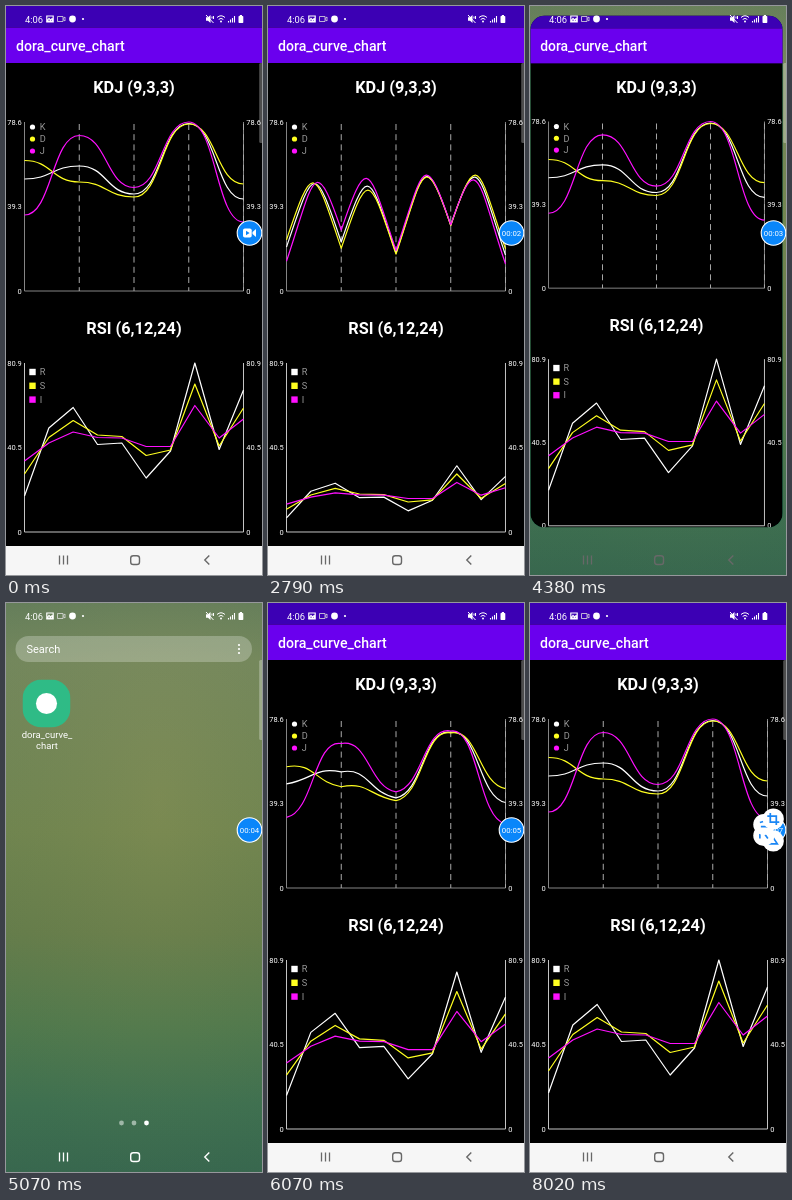
An HTML page for the animation above (8080 ms loop, 256x569 px).

```html
<!DOCTYPE html>
<html lang="en">
<head>
<meta charset="utf-8">
<title>Curve chart demo</title>
<style>
html, body { margin: 0; width: 100%; height: 100%; overflow: hidden; background: #000; }
svg { display: block; width: 100vw; height: 100vh; font-family: Roboto, "Open Sans", sans-serif; }
</style>
</head>
<body>
<svg id="stage" viewBox="0 0 256 569" preserveAspectRatio="none"></svg>
<script>
const LOOP = 8080, LAST = 8020;
const CLOSE = { starts: [1555, 4316], span: 400 };
const OPEN = { starts: [2420, 5110], span: 390 };
const CHART_STARTS = [2529, 5198], CHART_SPAN = 1190;
const COLORS = ['#fff', '#ffff20', '#ff10ff'];

const KDJ = [
  [173, 160, 188, 117.5, 193],
  [154.5, 176, 191, 118, 178],
  [209, 129.5, 181.5, 116, 216]
];
const RSI = [
  [490, 422, 401.5, 438.5, 437, 472, 445, 357, 443.5, 384],
  [468, 431.5, 414.5, 429, 430.5, 449.5, 444, 378, 440, 402],
  [455, 437, 426, 431.5, 432, 440.5, 440.5, 399.5, 432, 413]
];

const clamp = v => Math.max(0, Math.min(1, v));
const smooth = v => { v = clamp(v); return v * v * (3 - 2 * v); };
const inOut = v => v < .5 ? 4 * v ** 3 : 1 - 4 * (1 - v) ** 3;
const xAt = (i, n) => 18.5 + 219 * i / (n - 1);
const text = (x, y, size, s, extra = '') =>
  `<text x="${x}" y="${y}" font-size="${size}" fill="#fff" ${extra}>${s}</text>`;
const rect = (x, y, w, h, fill, extra = '') =>
  `<rect x="${x}" y="${y}" width="${w}" height="${h}" fill="${fill}" ${extra}/>`;
const circle = (x, y, r, fill, extra = '') =>
  `<circle cx="${x}" cy="${y}" r="${r}" fill="${fill}" ${extra}/>`;
const path = (d, color, width = 1, extra = '') =>
  `<path d="${d}" fill="none" stroke="${color}" stroke-width="${width}" ${extra}/>`;

function axes(top, labels, color) {
  const bottom = top + 169;
  return path(`M18.5 ${top}V${bottom}H237.5V${top}`, color) +
    labels.map((s, i) => {
      const y = top + 84.5 * i + 2.7;
      return text(15.8, y, 7.5, s, 'text-anchor="end"') + text(240.3, y, 7.5, s);
    }).join('');
}

function legend(names, top, gap, mark) {
  return [...names].map((s, i) =>
    mark(26.5, top + gap * i, COLORS[i]) +
    text(33.8, top + gap * i + 3.3, 9.2, s, 'style="fill:#999"')).join('');
}

const lines = id => COLORS.map((c, i) =>
  path('', c, 1.2, `id="${id}${i}" stroke-linejoin="round"`)).join('');

const appMarkup = () =>
  rect(0, 0, 256, 569, '#000') +
  rect(0, 0, 256, 21.5, '#3c00b4') +
  rect(0, 21.5, 256, 35.5, '#6a00ee') +
  rect(0, 540, 256, 29, '#f6f6f6') +
  text(10, 44.8, 14.1, 'dora_curve_chart', 'font-weight="500"') +
  text(128, 86.7, 16.3, 'KDJ (9,3,3)', 'font-weight="700" text-anchor="middle"') +
  text(128, 328, 16.3, 'RSI (6,12,24)', 'font-weight="700" text-anchor="middle"') +
  axes(116, ['78.6', '39.3', '0'], '#858585') +
  [1, 2, 3, 4].map(i =>
    path(`M${xAt(i, 5)} 118V285`, '#aaa', 1, 'stroke-dasharray="6 4.2"')).join('') +
  lines('kdj') +
  legend('KDJ', 121, 12, (x, y, c) => circle(x, y, 2.6, c)) +
  axes(357, ['80.9', '40.5', '0'], '#c4c4c4') +
  lines('rsi') +
  legend('RSI', 366, 13.8, (x, y, c) => rect(x - 3.2, y - 3.2, 6.4, 6.4, c));

const wallpaper = () =>
  rect(0, 0, 256, 569, 'url(#sky)') +
  rect(0, 0, 256, 569, 'url(#glow)');

const homeMarkup = () =>
  rect(9.5, 33, 236.5, 26, '#fff', 'rx="13" opacity=".25"') +
  text(20.5, 50, 11, 'Search') +
  [42, 46, 50].map(y => circle(233, y, 1.1, '#fff')).join('') +
  text(41, 135, 9.5, 'dora_curve_', 'text-anchor="middle"') +
  text(41, 146, 9.5, 'chart', 'text-anchor="middle"') +
  [115.5, 128, 140.5].map((x, i) =>
    circle(x, 520, 2.4, '#fff', `opacity="${i < 2 ? .5 : 1}"`)).join('');

const statusMarkup = () =>
  text(19, 16.7, 9.4, '4:06') +
  path('M40.8 10H47.2V16H40.8ZM41 15L43 12.5L44.5 14L46 12.7L47 15Z', '#fff', 1.2) +
  path('M51.5 10.5H57V15.5H51.5ZM57 12.5L59 11V15L57 13.5', '#ddd', .8) +
  circle(66.5, 13, 3.4, '#fff') +
  circle(77, 13, 1.1, '#fff') +
  '<path d="M200 11.3H202L204.5 9V17L202 14.7H200Z" fill="#fff"/>' +
  path('M200 9L207.5 17M206 10.5V12.5M207.5 10V13', '#fff', 1) +
  path('M211 11.5Q215 8 219 11.5M212.7 13.4Q215 11.4 217.3 13.4', '#fff', 1) +
  circle(215, 15.5, 1, '#fff') +
  path('M222.5 16.5V15M224.5 16.5V13.5M226.5 16.5V12M228.5 16.5V10', '#fff', 1.1) +
  rect(232.5, 10, 4.8, 7, '#fff', 'rx=".8"') + rect(233.8, 9, 2.2, 1.5, '#fff');

const navMarkup = () =>
  path('M53.5 549.5V558.5M57.5 549.5V558.5M61.5 549.5V558.5', 'currentColor', 1.3) +
  rect(124.7, 549.7, 8.8, 8.8, 'none', 'rx="2.6" stroke="currentColor" stroke-width="1.4"') +
  path('M203.3 549.5L198.8 554L203.3 558.5', 'currentColor', 1.4);

// small blue glyphs for the pop-out buttons, in drawing order
const GLYPHS = [
  'M-4 3L0 -3L4 3Z',
  'M-4 -3V3M-1 -4L4 3',
  'M-4 -2L3 -4M-3 2H4',
  'M-3 -6V3H6M-6 -3H3V6'
];
const ANGLES = [270, 210, 150, 90];

const ballMarkup = () =>
  circle(243.5, 227, 12.3, '#0a86fa', 'stroke="#fff" stroke-width="1.1"') +
  `<g id="camera" fill="#fff">${rect(237, 222.5, 8.7, 9, '#fff', 'rx="1.8"')}
    <path d="M246.5 226L250 223V231L246.5 228Z"/>
    <path d="M240 224.8L243.6 227L240 229.2Z" fill="#0a86fa"/></g>` +
  text(243.5, 229.8, 7.8, '', 'id="clock" text-anchor="middle"');

const menuMarkup = () => GLYPHS.map((d, i) =>
  `<g id="pop${i}">${circle(0, 0, 10.6, '#fff')}${path(d, '#1a86f5', 1.7)}</g>`).join('');

const stops = list => list.map(([o, c]) => `<stop offset="${o}" stop-color="${c}"/>`).join('');

document.getElementById('stage').innerHTML = `
  <defs>
    <linearGradient id="sky" x2="0" y2="1">${stops([
      [0, '#6a805c'], [.1, '#7a8a5e'], [.4, '#76874f'], [.58, '#6a7e4a'],
      [.74, '#537a4c'], [.88, '#3f7050'], [1, '#37664e']])}</linearGradient>
    <radialGradient id="glow" cx=".6" cy=".35" r=".7">
      <stop offset="0" stop-color="#8a9358" stop-opacity=".22"/>
      <stop offset="1" stop-color="#3f7050" stop-opacity=".12"/>
    </radialGradient>
    <clipPath id="mask"><rect id="hole"/></clipPath>
  </defs>
  ${wallpaper()}
  <g id="home">${homeMarkup()}</g>
  <g clip-path="url(#mask)">
    <rect id="tile" fill="#2fbb86"/><circle id="badge" fill="#fff"/>
    <g id="app">${appMarkup()}</g>
  </g>
  ${rect(253.2, 57, 4, 80, '#fff', 'rx="1.5" opacity=".3"')}
  <g>${statusMarkup()}</g>
  <g id="nav">${navMarkup()}</g>
  <g>${ballMarkup()}</g>
  <g id="menu">${menuMarkup()}</g>`;

const $ = id => document.getElementById(id);
const set = (id, attrs) => {
  for (const k in attrs) $(id).setAttribute(k, attrs[k]);
};

// shrink: 0 full screen, 1 launcher icon
function windowState(t) {
  const at = ({ starts, span }) => {
    const start = starts.filter(s => s <= t).pop();
    return start === undefined ? null : { start, v: clamp((t - start) / span) };
  };
  const close = at(CLOSE), open = at(OPEN);
  if (!close) return { shrink: 0, crop: 0, radius: 0, alpha: 1, home: 0, dark: true };
  if (open && open.start > close.start) {
    const v = open.v;
    return {
      shrink: (1 - v) ** 4, crop: 1 - smooth(v / .45), radius: 93 * (1 - v) ** 2,
      alpha: smooth(v / .4), home: clamp(1 - 3 * v), dark: v > .3
    };
  }
  const v = close.v;
  return {
    shrink: inOut(v), crop: smooth(v / .64), radius: 88 * v,
    alpha: 1 - smooth((v - .4) / .6), home: smooth((v - .2) / .4), dark: v < .4
  };
}

function drawWindow(t) {
  const s = windowState(t);
  const scale = 1 - .8125 * s.shrink;
  const x = 16.5 * s.shrink, y0 = 66.2 * s.shrink;
  const y = y0 + 55 * s.crop * scale;
  const width = 256 * scale, height = (569 - 313 * s.crop) * scale;
  const box = { x, y, width, height };
  set('hole', { ...box, rx: Math.min(.4 * width, s.radius) });
  set('tile', box);
  set('badge', { cx: x + width / 2, cy: y + height / 2, r: .22 * width });
  set('app', { transform: `translate(${x} ${y0}) scale(${scale})`, opacity: s.alpha });
  set('home', { opacity: s.home });
  $('nav').style.color = s.dark ? '#686868' : '#fff';
}

function chartProgress(t) {
  const start = CHART_STARTS.filter((s, i) => OPEN.starts[i] <= t).pop();
  return start === undefined ? 1 : 1 - (1 - clamp((t - start) / CHART_SPAN)) ** 2;
}

function drawCharts(p) {
  const grow = (y, base) => base - (base - y) * p;
  // handles start high and settle onto the data
  const handle = y => p * y + (1 - p) * (105 + 118 * p);
  KDJ.forEach((ys, k) => {
    let d = `M18.5 ${grow(ys[0], 285)}`;
    for (let i = 1; i < 5; i++) {
      const mid = (xAt(i - 1, 5) + xAt(i, 5)) / 2;
      d += `C${mid} ${handle(ys[i - 1])} ${mid} ${handle(ys[i])} ${xAt(i, 5)} ${grow(ys[i], 285)}`;
    }
    set('kdj' + k, { d });
  });
  RSI.forEach((ys, k) => set('rsi' + k, {
    d: 'M' + ys.map((y, i) => `${xAt(i, 10)} ${grow(y, 526)}`).join('L')
  }));
}

function drawBall(t) {
  const timing = t >= 340;
  $('camera').style.display = timing ? 'none' : '';
  $('clock').textContent = timing ? '00:0' + Math.max(0, Math.floor((t - 450) / 1000)) : '';
  const out = 1 - (1 - clamp((t - 7240) / 250)) ** 3;
  const reach = 42 * out * (1 - smooth((t - 7920) / 150));
  $('menu').style.display = t >= 7240 ? '' : 'none';
  ANGLES.forEach((deg, i) => {
    const a = deg * Math.PI / 180;
    set('pop' + i, {
      transform: `translate(${243.3 + reach * Math.cos(a)} ${227 - reach * Math.sin(a)})`
    });
  });
}

function draw(t) {
  drawWindow(t);
  drawCharts(chartProgress(t));
  drawBall(t);
}

const begin = performance.now();
function tick() {
  draw(Math.min((performance.now() - begin) % LOOP, LAST));
  requestAnimationFrame(tick);
}
tick();
</script>
</body>
</html>
```
